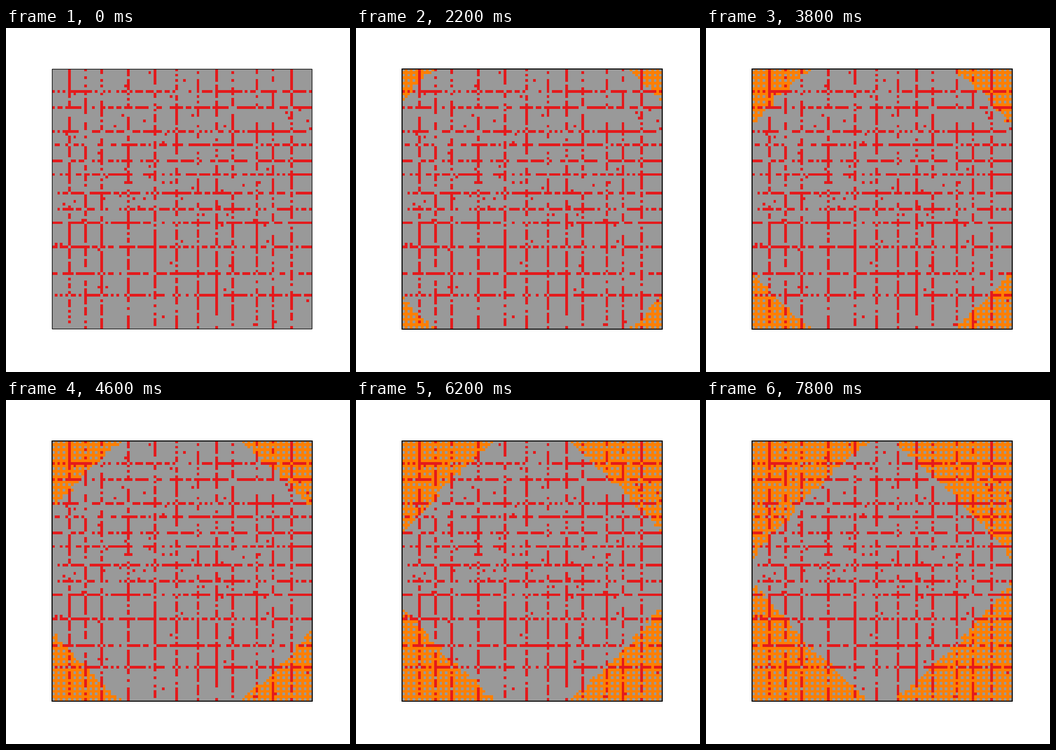
Write a matplotlib script that moves like this. It is 748x748 px and loops after 8 s.

```python
import numpy as np
import matplotlib.pyplot as plt
from matplotlib.animation import FuncAnimation
from matplotlib.colors import ListedColormap
from matplotlib.patches import Rectangle
from matplotlib.transforms import IdentityTransform

SIZE, DPI = 748, 100
N = 97                              # cells per side
LEFT, BOTTOM, SIDE = 100, 94, 565   # grid box in pixels
STEPS, INTERVAL = 40, 200
GRAY, RED, ORANGE = range(3)
COLORS = ["#999999", "#e41a1c", "#ff7f00"]

ROWS = [8, 14, 23, 28, 34, 39, 46, 52, 57, 66, 76, 84]
COLS = [6, 12, 18, 28, 38, 46, 54, 61, 67, 76, 82, 89]
STREET_FILL, CROSS_FILL, STRAYS = 0.7, 0.5, 62

rng = np.random.default_rng(12)


def street_mask():
    """Dashed street lines plus a few cells scattered between them."""
    lines = np.zeros((N, N), bool)
    lines[ROWS] = True
    lines[:, COLS] = True
    fill = np.full((N, N), STREET_FILL)
    fill[np.ix_(ROWS, COLS)] = CROSS_FILL
    mask = lines & (rng.random((N, N)) < fill)
    free = np.flatnonzero(~lines)
    mask.flat[rng.choice(free, STRAYS, replace=False)] = True
    return mask


def arrival_map():
    """Distance at which the front from the nearest corner takes a cell."""
    edge = np.minimum(np.arange(N), N - 1 - np.arange(N))
    i, j = np.meshgrid(edge, edge, indexing="ij")
    half = N // 2 + 1
    rough = np.kron(rng.uniform(-1, 1, (half, half)), np.ones((2, 2)))
    dist = i + j + 0.12 * np.minimum(i, j)
    return dist + rough[:N, :N] * np.minimum(1, dist / 20)


streets = street_mask()
arrival = arrival_map()
even = np.arange(N) % 2 == 0
holes = np.outer(even, even)


def cells(step):
    grid = np.full((N, N), GRAY)
    reach = 1.13 * step - 1
    grid[(arrival < reach) & ~holes] = ORANGE
    grid[streets] = RED
    return grid


def add_border(pad, width):
    """Square outline, centred half a pixel plus pad outside the grid's corner."""
    box = Rectangle((LEFT + 0.5 - pad, BOTTOM - 0.5 - pad),
                    SIDE + 2 * pad, SIDE + 2 * pad,
                    fill=False, edgecolor="black", linewidth=width * 72 / DPI,
                    joinstyle="miter", snap=False,
                    transform=IdentityTransform())
    return fig.add_artist(box)


fig = plt.figure(figsize=(SIZE / DPI, SIZE / DPI), dpi=DPI, facecolor="white")
ax = fig.add_axes([LEFT / SIZE, BOTTOM / SIZE, SIDE / SIZE, SIDE / SIZE])
ax.axis("off")
image = ax.imshow(cells(0), cmap=ListedColormap(COLORS), vmin=0, vmax=2,
                  interpolation="nearest", aspect="auto")
add_border(0, 1.39)
outer = add_border(1, 1)            # the border thickens after the first step
outer.set_visible(False)


def update(step):
    image.set_data(cells(step))
    outer.set_visible(step > 0)
    return image, outer


anim = FuncAnimation(fig, update, frames=STEPS, interval=INTERVAL,
                     repeat=True, repeat_delay=0, blit=False)
plt.show()
```
